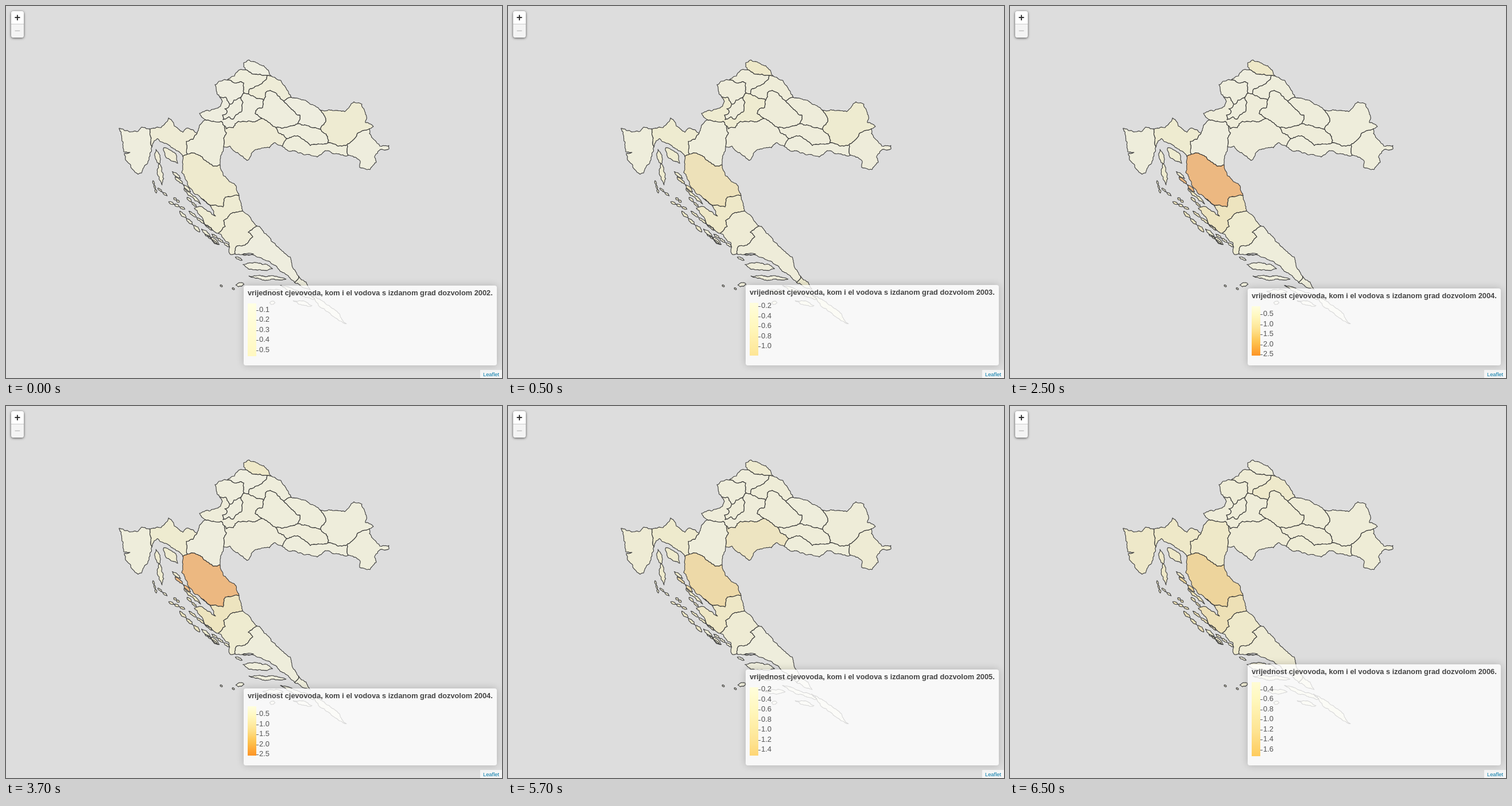
An HTML page that plays this animation: 864 px wide and 648 px high, repeating every 8 s.

```html
<!DOCTYPE html>
<html lang="hr">
<head>
<meta charset="utf-8">
<style>
html, body { margin: 0; width: 100%; height: 100%; overflow: hidden; background: #ddd; }
body { position: relative; font-family: "Liberation Sans", Arial, sans-serif; }
svg, div { position: absolute; }
#map { left: 0; top: 0; }
#map path { fill-opacity: .5; stroke: #3c3c3c; stroke-width: 1.1; stroke-linejoin: round; }
#legend { left: 414px; width: 441px; background: rgba(255,255,255,.8); border-radius: 4px;
  box-shadow: 0 0 13px rgba(0,0,0,.2); white-space: nowrap; }
#title { left: 7px; top: 5px; font-weight: bold; font-size: 12.8px; line-height: 16px; color: #444; }
#bar { left: 7px; top: 31px; width: 15px; }
.label { left: 27px; font-size: 13px; line-height: 16px; color: #555; }
.label::before { content: ""; position: absolute; left: -5px; top: 9px; width: 4px; height: 1px; background: #666; }
#zoom { left: 9px; top: 9px; width: 22px; height: 46px; border-radius: 4px;
  background: linear-gradient(#fff 22px, #ccc 22px 23px, #f4f4f4 23px); box-shadow: 0 1px 4px rgba(0,0,0,.65); }
#zoom text { font: bold 18px "Liberation Mono", monospace; text-anchor: middle; }
#zoom .off { font-weight: normal; fill: #bbb; }
#credit { right: 0; bottom: 0; width: 38px; height: 14px; background: rgba(255,255,255,.7);
  color: #0078a8; font-size: 9.4px; line-height: 15px; text-align: center; }
</style>
</head>
<body>
<svg id="map" width="864" height="648"></svg>
<div id="zoom"><svg width="22" height="46"><text x="11" y="17" fill="#333">+</text><text class="off" x="11" y="40">−</text></svg></div>
<div id="legend"><div id="title"></div><div id="bar"></div><div id="ticks"></div></div>
<div id="credit">Leaflet</div>
<script>
const points = s => s ? s.split(' ').map(p => p.split(',').map(Number)) : [];

// Junctions where borders meet, lettered a-z then A-Q.
const letters = 'abcdefghijklmnopqrstuvwxyzABCDEFGHIJKLMNOPQ';
const nodes = points('417,111 455,121 462,122 422,153 414,152 385,129 372,158 390,171 409,159 347,198 381,209 ' +
  '446,196 449,164 484,166 497,159 508,205 470,212 547,181 548,215 633,214 594,242 561,238 596,260 489,231 ' +
  '481,244 379,245 373,277 316,258 333,221 308,262 250,214 254,246 406,330 340,335 412,357 370,396 437,383 ' +
  '399,432 510,471 503,482 378,198 197,213 530,494');

// Key bends of the borders between two junctions; the rest is straight.
const bends = {
  ac: '414,99 423,94 449,104', ab: '428,118', bd: '454,127 438,139 424,145', ef: '414,134 394,132',
  fa: '398,122 405,112', gf: '364,137 371,131', gh: '383,159', hi: '397,164',
  iO: '413,168 411,183 396,197 388,193', Oh: '377,190 385,185 381,179', gj: '377,166 374,174 354,183 337,187',
  jk: '366,202 375,201', kl: '384,214 396,212 405,201 427,201', lm: '434,187 438,179 447,177', dm: '436,161',
  mn: '452,151 460,147', co: '479,130 490,147', np: '504,186 512,190', pq: '490,211', lq: '460,204',
  or: '519,164', rs: '557,196', ps: '530,211', rt: '590,184 606,167 620,171 628,193 626,203 640,210',
  tu: '612,222 604,234', uv: '578,244', vs: '560,227',
  tw: '633,222 651,244 667,243 667,249 652,250 642,262 645,272 634,285 616,281 617,270',
  xv: '508,226 530,243', qx: '476,222', yw: '490,251 542,263 557,252', yz: '468,238 459,247 435,250 420,269 390,244',
  zk: '379,230 384,221', zA: '376,258', AB: '361,279 342,263 325,256', CB: '326,232 314,236', jC: '339,206',
  EC: '270,212 283,195 293,209 308,220 314,213', EF: '253,230', FD: '258,235 264,231 290,247',
  PF: '204,237 205,254 216,255 206,257 212,272 230,293 236,291 249,268', PE: '206,217 228,219 236,211',
  AG: '379,296 398,310', GH: '382,333 378,350 360,347', DH: '306,290 322,318',
  HJ: '361,356 365,366 338,349 328,352 344,378', IJ: '391,362 379,374 382,384',
  KL: '422,394 430,402 420,414 401,419', JL: '388,412 390,432', KM: '481,427 495,437 498,450',
  LN: '432,434 465,450', MQ: '523,481', QN: '519,491'
};

// Each county: its ring of junctions, then rows of islands as x1 y1 x2 y2 count width.
const counties = {
  ME: ['acb'], VZ: ['abdef'], KZ: ['gfeih'], GZ: ['hiO'], ZG: ['gjklmdeiOh'], KK: ['bconmd'], BB: ['mnpql'],
  VP: ['orspn'], OB: ['rtuvs'], VS: ['twu'], BP: ['ywuvx'], PS: ['psvxq'], SM: ['lqxyzk'], KA: ['zABCjk'],
  PG: ['ECBDF', '261 249 267 276 1 8', '266 273 272 313 1 9', '274 246 300 275 1 14', '289 288 305 301 1 5',
    '256 304 262 326 3 3', '264 317 281 331 2 3'],
  IS: ['PEF'],
  LS: ['DBAGH', '294 297 322 324 2 5'],
  ZD: ['GIJH', '309 317 340 346 1 6', '315 333 332 350 2 4', '283 341 312 354 3 4', '292 334 302 342 2 4',
    '302 357 338 394 3 5', '318 357 360 391 3 4'],
  SK: ['IKLJ', '340 388 372 416 2 5', '358 397 390 420 3 4', '346 397 370 416 2 3'],
  SD: ['KMNL', '411 450 466 458 1 12', '421 470 490 476 1 7', '400 486 415 485 1 7', '399 437 412 443 1 4',
    '411 433 432 432 1 3', '373 486 377 489 1 3', '394 491 398 494 1 3'],
  DN: ['MQN', '527 500 595 555 1 11', '446 497 484 498 1 8', '476 486 540 511 1 7', '499 513 534 522 1 6',
    '459 517 469 517 1 6']
};

// Range and tick step per year; LS holds the maximum, unlisted counties stay near the minimum.
const years = [
  { min: .034, max: .557, step: .1, high: { ZD: .45, OB: .45, KK: .3, SK: .35, SM: .35, PG: .35 } },
  { min: .126, max: 1.183, step: .2, high: { ME: .75, ZG: .5, OB: .5, PG: .5, ZD: .75, SK: .35, DN: .5 } },
  { min: .086, max: 2.557, step: .5, high: { ME: .75, PG: .5, ZD: 1, SK: .5 } },
  { min: .149, max: 1.514, step: .2, high: { ME: .55, SM: .95, PG: .6, ZD: .8, IS: .4, VS: .4, SK: .4 } },
  { min: .257, max: 1.726, step: .2, high: { KK: .65, KA: .75, PG: .75, IS: .7, ZD: 1.25, SK: .65 } }
];
const ramp = [[255, 255, 229], [255, 247, 188], [254, 227, 145], [254, 196, 79], [254, 153, 41], [236, 112, 20]];
const tickGap = 17.5, barEnd = 609.5, boxEnd = 625.5;
const $ = id => document.getElementById(id);
const mix = (a, b, f) => a.map((n, i) => n + (b[i] - n) * f);

function color(v) {
  const p = v / .62, i = Math.floor(p);
  return `rgb(${mix(ramp[i], ramp[i + 1], p - i).map(Math.round)})`;
}

function noise(x, y) {
  const n = Math.sin(x * 12.9898 + y * 78.233) * 43758.5453;
  return n - Math.floor(n) - .5;
}

// Midpoint displacement depends on position only, so shared borders agree.
function rough(a, b) {
  const d = Math.hypot(b[0] - a[0], b[1] - a[1]);
  if (d < 3) return [b];
  const [x, y] = mix(a, b, .5), k = Math.min(d, 11) * .32;
  const m = [x + noise(x, y) * k, y + noise(y, x) * k];
  return [...rough(a, m), ...rough(m, b)];
}

const outline = ring => 'M' + ring.flatMap((p, i) => rough(p, ring[(i + 1) % ring.length]))
  .map(p => p.map(n => n.toFixed(1))).join('L') + 'Z';

const border = ids => [...ids].flatMap((id, i) => {
  const next = ids[(i + 1) % ids.length];
  return [nodes[letters.indexOf(id)], ...(bends[id + next] ? points(bends[id + next]) : points(bends[next + id]).reverse())];
});

function islands(row) {
  const [x, y, u, v, count, width] = row.split(' ').map(Number);
  const k = width / 2 / Math.hypot(u - x, v - y);
  return Array.from({ length: count }, (_, i) => {
    const at = (f, side) => {
      const [px, py] = mix([x, y], [u, v], (i + f) / count);
      return [px + (y - v) * k * side, py + (u - x) * k * side];
    };
    return [at(.03, 0), at(.3, 1), at(.7, .8), at(.97, 0), at(.7, -1), at(.3, -.8)];
  });
}

const shapes = Object.entries(counties).map(([id, [ring, ...rows]]) => {
  const path = document.createElementNS('http://www.w3.org/2000/svg', 'path');
  path.setAttribute('d', [border(ring), ...rows.flatMap(islands)].map(outline).join(''));
  $('map').append(path);
  return { id, path };
});

function show(n) {
  const { min, max, step, high } = years[n];
  shapes.forEach(({ id, path }, i) => {
    const low = min + .15 * (noise(i, n) + .5);
    path.setAttribute('fill', color(id === 'LS' ? max : high[id] ?? low));
  });
  const height = (max - min) / step * tickGap, top = Math.round(barEnd - height) - 31;
  $('legend').style.cssText = `top:${top}px;height:${boxEnd - top}px`;
  $('title').textContent = `vrijednost cjevovoda, kom i el vodova s izdanom grad dozvolom ${2002 + n}.`;
  const stops = Array.from({ length: 13 }, (_, i) => color(min + (max - min) * i / 12));
  $('bar').style.cssText = `height:${height}px;background:linear-gradient(${stops})`;
  let labels = '';
  for (let i = Math.ceil(min / step); i * step < max; i++) {
    labels += `<div class="label" style="top:${22 + (i - min / step) * tickGap}px">${(i * step).toFixed(1)}</div>`;
  }
  $('ticks').innerHTML = labels;
}

let shown = -1;
function frame(now) {
  const n = Math.floor((now % 8000 + 1500) / 2000);
  if (n !== shown) show(shown = n);
  requestAnimationFrame(frame);
}
frame(performance.now());
</script>
</body>
</html>
```
